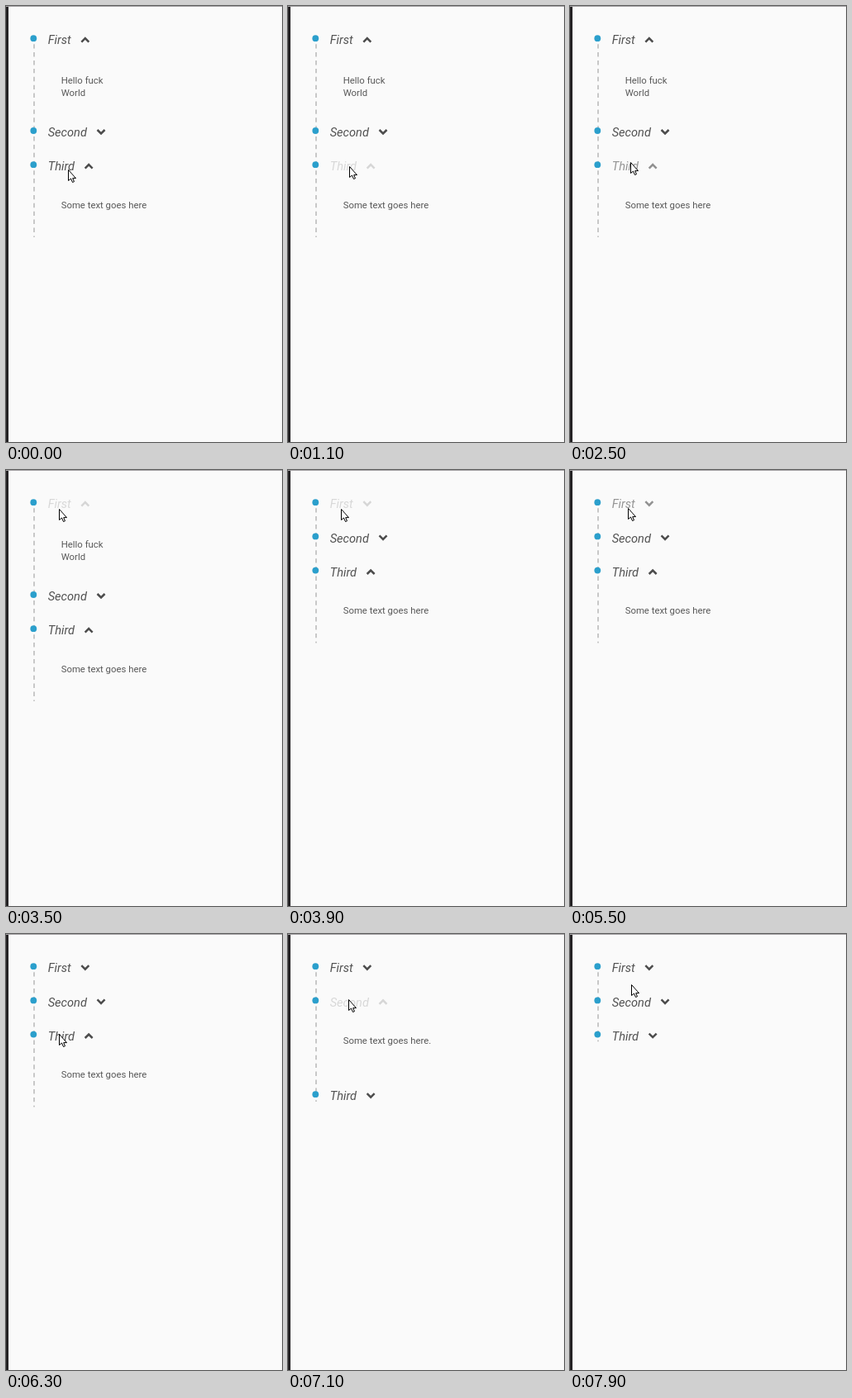
Recreate the animation shown at these times as an HTML page. Size 334x528 px, loop 8000 ms.

```html
<!DOCTYPE html>
<html>
<head>
<meta charset="utf-8">
<style>
  html, body { margin: 0; width: 100%; height: 100%; overflow: hidden; background: #fafafa; }
  svg { display: block; width: 334px; height: 528px; font-family: Roboto, sans-serif; }
  .title { font-size: 14.625px; font-style: italic; fill: #525252; }
  .body { font-size: 11.375px; fill: #585858; }
  .chevron { fill: none; stroke: #4c4c4c; stroke-width: 2.5; }
  .line { stroke: #c8c8c8; stroke-width: 2; stroke-dasharray: 5.4 4.5; }
  .dot { fill: #2b9fcc; }
</style>
</head>
<body>
<svg viewBox="0 0 334 528">
  <rect width="334" height="528" fill="#fafafa"/>
  <g id="list"></g>
  <rect width="3" height="528" fill="#242224"/>
  <rect width="334" height="1" fill="#a6a4a6"/>
  <path id="cursor" d="M.5 .5V13.5L3.5 11L5.5 15.5L7.5 14.7L5.7 10.6H9.5Z" fill="#fff" stroke="#000"/>
</svg>
<script>
const LOOP = 8000, STEP = 100, FADE = 200, TOP = 39.2, HEADER = 41.2;

const clamp = k => Math.min(1, Math.max(0, k));
const smooth = k => k * k * (3 - 2 * k);
const toStep = t => Math.floor(t / STEP) * STEP;

// A section toggles when the finger lifts.
const tap = (up, hold = 100) => ({ down: up - hold, up });
const rapidTaps = Array.from({ length: 5 }, (_, i) => tap(toStep(3600 + 450 * i)));

const sections = [
  { title: 'First', lines: ['Hello fuck', 'World'], textY: 54.9, extra: 70.6, open: true, taps: rapidTaps },
  { title: 'Second', lines: ['Some text goes here.'], textY: 52.5, extra: 72.6, open: false,
    taps: [tap(7100), tap(7700)] },
  { title: 'Third', lines: ['Some text goes here'], textY: 52.5, extra: 79.2, open: true,
    taps: [tap(1300, 200), tap(2400), tap(6500)] }
];

const cursorStart = { x: 75, y: 198 };
const cursorMoves = [
  { from: 0, to: 400, x: 74, y: 194 },
  { from: 2400, to: 2500, x: 73, y: 189 },
  { from: 2500, to: 3300, x: 64, y: 47 },
  { from: 4000, to: 4400, x: 70, y: 46 },
  { from: 5600, to: 6100, x: 64, y: 121 },
  { from: 6600, to: 7000, x: 73, y: 79 },
  { from: 7800, to: 7900, x: 74, y: 61 }
];

function add(parent, tag, attrs, text) {
  const el = document.createElementNS('http://www.w3.org/2000/svg', tag);
  for (const key in attrs) el.setAttribute(key, attrs[key]);
  if (text) el.textContent = text;
  return parent.appendChild(el);
}

const list = document.getElementById('list');
const cursor = document.getElementById('cursor');

for (const s of sections) {
  s.group = add(list, 'g', {});
  s.line = add(s.group, 'line', { class: 'line', x1: 34, x2: 34, y1: 7 });
  add(s.group, 'circle', { class: 'dot', cx: 33.3, cy: 0, r: 3.9 });
  s.header = add(s.group, 'g', {});
  const title = add(s.header, 'text', { class: 'title', x: 50.7, y: 7.2 }, s.title);
  s.chevronX = 50.7 + title.getComputedTextLength() + 17.1;
  s.chevron = add(s.header, 'path', { class: 'chevron', d: 'M-4.5 -2.7L0 1.8L4.5 -2.7' });
  s.content = add(s.group, 'g', {});
  s.lines.forEach((text, i) =>
    add(s.content, 'text', { class: 'body', x: 66.7, y: s.textY + 15 * i }, text));
}

function headerOpacity(taps, t) {
  const last = taps.filter(p => p.down <= t).pop();
  return last ? 0.2 + 0.8 * smooth(clamp((t - last.up) / FADE)) : 1;
}

function cursorAt(t) {
  let { x, y } = cursorStart;
  for (const m of cursorMoves) {
    const k = smooth(clamp((t - m.from) / (m.to - m.from)));
    x += (m.x - x) * k;
    y += (m.y - y) * k;
  }
  return [Math.round(x), Math.round(y)];
}

function draw(t) {
  let y = TOP;
  sections.forEach((s, i) => {
    const toggles = s.taps.filter(p => p.up <= t).length;
    const open = s.open !== (toggles % 2 === 1);
    const extra = open ? s.extra : 0;
    const isLast = i === sections.length - 1;
    s.group.setAttribute('transform', `translate(0 ${y})`);
    s.line.setAttribute('y2', (isLast ? 8.7 : HEADER) + extra);
    s.header.setAttribute('opacity', headerOpacity(s.taps, t));
    s.chevron.setAttribute('transform', `translate(${s.chevronX} 1.7) scale(1 ${open ? -1 : 1})`);
    s.content.setAttribute('visibility', open ? 'visible' : 'hidden');
    y += HEADER + extra;
  });
  cursor.setAttribute('transform', `translate(${cursorAt(t)})`);
}

const start = performance.now();
function tick() {
  draw(toStep((performance.now() - start) % LOOP));
  requestAnimationFrame(tick);
}
tick();
</script>
</body>
</html>
```
